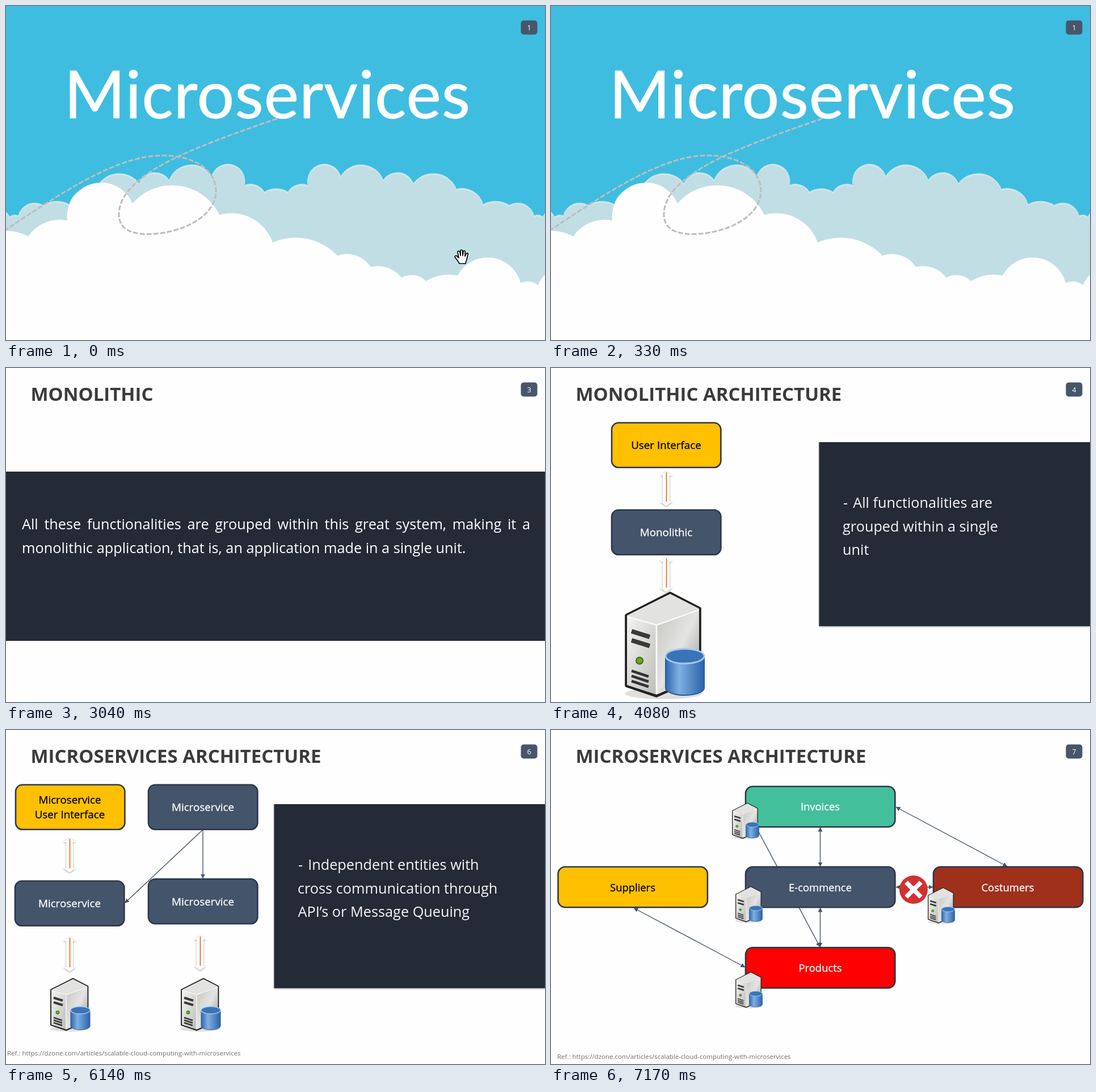
Animation of 950 by 590 pixels, one loop 8000 ms. Source, as an HTML page:

```html
<!DOCTYPE html>
<html lang="en">
<head>
<meta charset="utf-8">
<title>Microservices slides</title>
<style>
  html, body { margin: 0; width: 100%; height: 100%; overflow: hidden; background: #fefefe; }
  svg { display: block; width: 950px; height: 590px; font-family: "Open Sans", "Noto Sans", sans-serif; }

  /* Each slide appears at its time and covers the ones before it. */
  .slide, .hand { animation: 8s step-end infinite; }
  .hand { animation-name: hand; }
  #s2 { animation-name: show2; }
  #s3 { animation-name: show3; }
  #s4 { animation-name: show4; }
  #s5 { animation-name: show5; }
  #s6 { animation-name: show6; }
  #s7 { animation-name: show7; }
  @keyframes hand  { 0% { visibility: visible } 4.125%, 100% { visibility: hidden } }
  @keyframes show2 { 0% { visibility: hidden } 25.125%, 100% { visibility: visible } }
  @keyframes show3 { 0% { visibility: hidden } 38%, 100% { visibility: visible } }
  @keyframes show4 { 0% { visibility: hidden } 51%, 100% { visibility: visible } }
  @keyframes show5 { 0% { visibility: hidden } 63.875%, 100% { visibility: visible } }
  @keyframes show6 { 0% { visibility: hidden } 76.75%, 100% { visibility: visible } }
  @keyframes show7 { 0% { visibility: hidden } 89.625%, 100% { visibility: visible } }

  .page { fill: #fefefe; }
  .num { font-size: 12.5px; fill: #fff; text-anchor: middle; }
  .title { font-size: 32.95px; font-weight: 700; fill: #3b3b3b; }
  .panel { fill: #242a36; }
  .raised { filter: drop-shadow(0 1px 1.5px #0006); }
  .point { font-size: 25.25px; fill: #f6f6f6; }
  .ref { font-size: 11.48px; fill: #707070; }
  .trail { fill: none; stroke: #bdbdbd; stroke-width: 3; stroke-dasharray: 9 3; }
  .box { stroke: #2c384a; stroke-width: 2.6; fill: #44546a; }
  .label { font-size: 18.8px; fill: #fff; stroke: #fff; stroke-width: .3; text-anchor: middle; }
  #s7 .label { font-size: 18.4px; }
  .label.dark { fill: #000; stroke: #000; }
  .link { fill: none; stroke: #44546a; stroke-width: 1.4; marker-end: url(#tip); }
  .both { marker-start: url(#tip); }
  p { margin: 0; font-size: 25.25px; line-height: 42px; color: #fff; white-space: nowrap; }
  p.full { text-align: justify; text-align-last: justify; }
</style>
</head>
<body>
<svg viewBox="0 0 950 590">
  <defs>
    <marker id="tip" viewBox="0 0 8 8" refX="7.5" refY="4" markerWidth="8" markerHeight="8"
            markerUnits="userSpaceOnUse" orient="auto-start-reverse">
      <path d="M0 0L8 4L0 8Z" fill="#44546a"/>
    </marker>
    <linearGradient id="front" x2="1" y2="1">
      <stop stop-color="#f4f4f2"/><stop offset="1" stop-color="#bdbdba"/>
    </linearGradient>
    <linearGradient id="side" x2="1" y2="1">
      <stop stop-color="#c4c4c1"/><stop offset=".5" stop-color="#e4e4e2"/><stop offset="1" stop-color="#8f8f8c"/>
    </linearGradient>
    <linearGradient id="drum">
      <stop stop-color="#2f68ad"/><stop offset=".35" stop-color="#7fb0e2"/><stop offset="1" stop-color="#2c62a6"/>
    </linearGradient>

    <path id="bank" d="M476 322A40 40 0 0 1 497 328A29 29 0 0 1 532 316A30.1 30.1 0 0 1 590 300
      A42 42 0 0 1 665 307A30 30 0 0 1 718 313A44 44 0 0 1 794 323A38 38 0 0 1 841 350
      A46 46 0 0 1 887 351.5A30 30 0 0 1 931 370A14 14 0 0 1 946 372A26 26 0 0 1 960 359V600H476Z"/>
    <g id="banks">
      <use href="#bank"/>
      <use href="#bank" transform="translate(952.5 0) scale(-1 1)"/>
    </g>

    <rect id="badge" x="907.5" y="25.5" width="29" height="25" rx="5" fill="#48566b"/>

    <g id="server">
      <ellipse cx="34" cy="90" rx="34" ry="5" fill="#000" opacity=".12"/>
      <path d="M1.5 21L40 1.5L66 15V75L28 92L1.5 83Z" fill="#222" stroke="#222" stroke-width="2.8" stroke-linejoin="round"/>
      <path d="M2 21L40 2L65.5 15L28 29Z" fill="#e2e2e0"/>
      <path d="M28 29L65.5 15V75L28 91Z" fill="url(#side)"/>
      <path d="M2 21L28 29V91L2 82.5Z" fill="url(#front)"/>
      <path d="M28 30V90M3 22L28 29.5L65 16" stroke="#fafaf8" stroke-width="1.4" fill="none"/>
      <path d="M6 35L22 40M6 43L22 48" stroke="#3a3a3a" stroke-width="4"/>
      <path d="M6 70L21 75M6 74.5L21 79.5M6 79L21 84" stroke="#333" stroke-width="2.4"/>
      <circle cx="13" cy="61" r="3" fill="#69a823" stroke="#3f6a12"/>
      <path d="M36 57V85A17 6.5 0 0 0 70 85V57Z" fill="url(#drum)" stroke="#2b5c99"/>
      <ellipse cx="53" cy="57" rx="17" ry="6.5" fill="#3a74b8" stroke="#a9cbee" stroke-width="1.4"/>
    </g>

    <g id="updown">
      <path class="raised" d="M0 0L11 8H6V54H11L0 62L-11 54H-6V8H-11Z" fill="#fff"/>
      <path d="M.5 2V54" stroke="#ed7d31" stroke-width="2"/>
    </g>

    <rect id="node" x="1" y=".8" width="192.4" height="79" rx="12"/>
    <rect id="wide" x="1" y=".8" width="263.4" height="71.4" rx="12.5"/>
  </defs>

  <g id="s1">
    <rect width="950" height="590" fill="#3ebde0"/>
    <use href="#banks" fill="#cde4ea"/>
    <use href="#banks" y="3.5" fill="#c1dee5"/>
    <path class="page" d="M0 397A81 81 0 0 1 39 407A67 67 0 0 1 108 379A60 60 0 0 1 223 349
      A92 92 0 0 1 376 369A77 77 0 0 1 470 418A100 100 0 0 1 584 441A50 50 0 0 1 643 461
      A52 52 0 0 1 697 480A35 35 0 0 1 740 486A80 80 0 0 1 796 476A60 60 0 0 1 907 489
      A30 30 0 0 1 938 493A40 40 0 0 1 950 475V590H0Z"/>
    <path class="trail" d="M478 199C410 222 340 248 301 267C250 292 199 325 199 368
      C199 392 217 403 250 403C310 402 370 372 370 327C370 288 330 264 275 264C195 264 95 332 0 395"/>
    <text x="102.5" y="198" font-family="Lato, sans-serif" font-size="116" letter-spacing="1.05"
          fill="#fff" stroke="#fff">Microservices</text>
    <use href="#badge"/><text class="num" x="922" y="42.5">1</text>
    <path class="hand" transform="translate(790 430)" fill="#fff" stroke="#000" stroke-width="1.7" stroke-linejoin="round"
      d="M9 25C7 20 4 18 1.5 14C0 11 4 10 6 13L8 15L6 5C6 2 9 2 10 5L11 11V3C11 0 14.5 0 14.5 3L15 11
      L16 4C16.5 1.5 19.5 2 19.3 4.5L19 12L21 8C22 5.5 25 6.5 24 9L22.5 16C22 20 20 22 20 25Z"/>
  </g>

  <g id="s2" class="slide">
    <rect class="page" width="950" height="590"/>
    <g stroke-width="4.5">
      <path d="M299 205.7H388" stroke="#44546a"/>
      <path d="M387.5 205.7H477" stroke="#1e88bd"/>
      <path d="M476 205.7H566" stroke="#44bf9b"/>
      <path d="M565.5 205.7H655" stroke="#9bb531"/>
    </g>
    <text class="title" x="289" y="261" style="font-size:46.4px">MICROSERVICES</text>
    <text x="326" y="292" font-size="19.5" fill="#41b898">MICROSERVICES VS MONOLITHIC</text>
    <text x="360" y="342" font-size="15" fill="#7f7f7f">By Marcelino Prado – G00452918</text>
    <path class="trail" d="M231 590C262 566 294 538 294 505C294 475 270 450 245 450
      C212 450 188 474 188 510C188 545 215 565 262 565C350 564 425 490 470 378"/>
    <path d="M477 357L458 379L469 376.5L477 385Z" fill="#98a5a8"/>
    <use href="#badge"/><text class="num" x="922" y="42.5">2</text>
  </g>

  <g id="s3" class="slide">
    <rect class="page" width="950" height="590"/>
    <text class="title" x="43.5" y="58">MONOLITHIC</text>
    <rect class="panel" y="183" width="950" height="299"/>
    <foreignObject x="28" y="254" width="896" height="84">
      <p class="full">All these functionalities are grouped within this great system, making it a</p>
      <p>monolithic application, that is, an application made in a single unit.</p>
    </foreignObject>
    <use href="#badge"/><text class="num" x="922" y="42.5">3</text>
  </g>

  <g id="s4" class="slide">
    <rect class="page" width="950" height="590"/>
    <text class="title" x="43.5" y="58">MONOLITHIC ARCHITECTURE</text>
    <use href="#node" class="box" x="106" y="96" style="fill:#ffc000"/>
    <text class="label dark" x="203" y="143">User Interface</text>
    <use href="#updown" x="203" y="182"/>
    <use href="#node" class="box" x="106" y="250"/>
    <text class="label" x="203" y="297">Monolithic</text>
    <use href="#updown" x="203" y="334"/>
    <use href="#server" transform="translate(130 395) scale(2)"/>
    <rect class="panel raised" x="472.5" y="131" width="480" height="325"/>
    <text class="point" x="515" y="247">-<tspan dx="2.5"> All functionalities are</tspan></text>
    <text class="point" x="514" y="288.5">grouped within a single</text>
    <text class="point" x="514" y="330">unit</text>
    <use href="#badge"/><text class="num" x="922" y="42.5">4</text>
  </g>

  <g id="s5" class="slide">
    <rect class="page" width="950" height="590"/>
    <text class="title" x="43.5" y="58">MICROSERVICES</text>
    <rect class="panel" y="183" width="950" height="299"/>
    <foreignObject x="28" y="254" width="896" height="84">
      <p class="full">Is a service that is responsible for one part of the business logic and</p>
      <p>communicate with each other usually by http.</p>
    </foreignObject>
    <use href="#badge"/><text class="num" x="922" y="42.5">5</text>
  </g>

  <g id="s6" class="slide">
    <rect class="page" width="950" height="590"/>
    <text class="title" x="43.5" y="58">MICROSERVICES ARCHITECTURE</text>
    <use href="#node" class="box" x="16" y="96" style="fill:#ffc000"/>
    <use href="#node" class="box" x="250" y="96"/>
    <use href="#node" class="box" x="15" y="266"/>
    <use href="#node" class="box" x="250" y="262.5"/>
    <text class="label dark" x="112.5" y="130">Microservice</text>
    <text class="label dark" x="112.5" y="155.5">User Interface</text>
    <text class="label" x="347" y="143">Microservice</text>
    <text class="label" x="112" y="313">Microservice</text>
    <text class="label" x="347" y="309.5">Microservice</text>
    <path class="link" d="M346.5 176.5L209.5 305.5"/>
    <path class="link" d="M347 177V262"/>
    <use href="#updown" x="112" y="190"/>
    <use href="#updown" x="112" y="365"/>
    <use href="#updown" x="342" y="362.5"/>
    <use href="#server" x="78" y="438"/>
    <use href="#server" x="308" y="438"/>
    <rect class="panel raised" x="472.5" y="131" width="480" height="325"/>
    <text class="point" x="515" y="247">-<tspan dx="2.5"> Independent entities with</tspan></text>
    <text class="point" x="514" y="288.5">cross communication through</text>
    <text class="point" x="514.5" y="330">API’s or Message Queuing</text>
    <text class="ref" x="2" y="575">Ref.: https://dzone.com/articles/scalable-cloud-computing-with-microservices</text>
    <use href="#badge"/><text class="num" x="922" y="42.5">6</text>
  </g>

  <g id="s7" class="slide">
    <rect class="page" width="950" height="590"/>
    <text class="title" x="43.5" y="58">MICROSERVICES ARCHITECTURE</text>
    <path class="link" d="M342 135L474 383"/>
    <path class="link both" d="M474.5 172V241"/>
    <path class="link both" d="M474.5 314V383"/>
    <path class="link both" d="M608 136L804 241"/>
    <path class="link both" d="M146 314.5L342 419"/>
    <path class="link both" d="M608 277.5H673"/>
    <use href="#wide" class="box" x="342" y="99" style="fill:#44bf9b"/>
    <use href="#wide" class="box" x="342" y="241"/>
    <use href="#wide" class="box" x="342" y="383.5" style="fill:#f00"/>
    <use href="#wide" class="box" x="11.5" y="241" style="fill:#ffc000"/>
    <use href="#wide" class="box" x="673" y="241" style="fill:#9f301c"/>
    <text class="label" x="474.5" y="142">Invoices</text>
    <text class="label" x="474.5" y="284.5">E-commence</text>
    <text class="label" x="474.5" y="427">Products</text>
    <text class="label dark" x="144" y="284.5">Suppliers</text>
    <text class="label" x="805" y="284.5">Costumers</text>
    <circle cx="639" cy="282" r="25" fill="#d03230"/>
    <path d="M626 269L652 295M652 269L626 295" stroke="#fff" stroke-width="8"/>
    <use href="#server" transform="translate(319 128.5) scale(.68)"/>
    <use href="#server" transform="translate(325 276) scale(.68)"/>
    <use href="#server" transform="translate(664 278) scale(.68)"/>
    <use href="#server" transform="translate(325 427) scale(.68)"/>
    <text class="ref" x="11" y="581">Ref.: https://dzone.com/articles/scalable-cloud-computing-with-microservices</text>
    <use href="#badge"/><text class="num" x="922" y="42.5">7</text>
  </g>
</svg>
</body>
</html>
```
